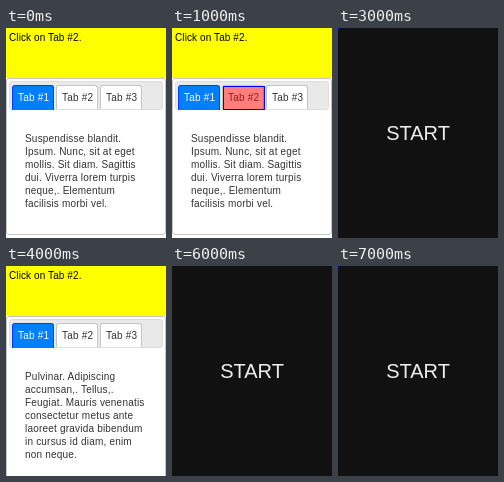
Animation, 160 px wide and 210 px high, one loop 8000 ms. Source, as an HTML page:

```html
<!DOCTYPE html>
<html lang="en">
<head>
<meta charset="utf-8">
<title>Click on the tab</title>
<style>
  html, body { margin: 0; width: 100%; height: 100%; overflow: hidden; background: #fff; }
  * { box-sizing: border-box; }
  body { font: 10px/12px "Liberation Sans", Arial, sans-serif; }
  #stage { position: relative; width: 160px; height: 210px; overflow: hidden; }
  #stage div { position: absolute; white-space: pre; }

  #query { left: 0; top: 0; width: 160px; height: 50px; padding: 4px 3px; background: #ff0; color: #000; letter-spacing: .1px; }
  #widget { left: 0; top: 50px; width: 160px; border: 1px solid #c5c5c5; border-radius: 3px; background: #fff; }
  #nav { left: 3px; top: 53px; width: 154px; height: 29px; border: 1px solid #ddd; border-radius: 3px; background: #e9e9e9; }
  .tab, #panel { letter-spacing: .2px; color: #333; }
  .tab {
    top: 57px; width: 42px; height: 24px; padding: 6px 0 0 5px;
    border: 1px solid #c5c5c5; border-bottom: 0; border-radius: 3px 3px 0 0;
    background: #fff;
  }
  .tab.active { height: 25px; border-color: #003eff; background: #007fff; color: #fff; }
  #panel { left: 19px; top: 104px; line-height: 13px; }
  #mark { left: 51px; top: 58px; width: 42px; height: 24px; border: 1px solid #00f; background: rgba(255, 0, 0, .5); }
  #cover { inset: 0; background: #111; color: #eee; font-size: 20px; line-height: 210px; text-align: center; }
  #dot { left: 0; top: 0; width: 1px; height: 2px; background: #00f; }
</style>
</head>
<body>
<div id="stage">
  <div id="query">Click on Tab #2.</div>
  <div id="widget"></div>
  <div id="nav"></div>
  <div class="tab active" style="left: 6px">Tab #1</div>
  <div class="tab" style="left: 50px">Tab #2</div>
  <div class="tab" style="left: 94px">Tab #3</div>
  <div id="panel"></div>
  <div id="mark"></div>
  <div id="cover">START</div>
  <div id="dot"></div>
</div>
<script>
  const STEP = 1000;
  const pages = [
    ["Suspendisse blandit.", "Ipsum. Nunc, sit at eget", "mollis. Sit diam. Sagittis",
     "dui. Viverra lorem turpis", "neque,. Elementum", "facilisis morbi vel."],
    ["Pulvinar. Adipiscing", "accumsan,. Tellus,.", "Feugiat. Mauris venenatis",
     "consectetur metus ante", "laoreet gravida bibendum", "in cursus id diam, enim", "non neque."]
  ];
  const $ = id => document.getElementById(id);
  const show = (id, on) => { $(id).style.visibility = on ? "visible" : "hidden"; };
  let last = -1;

  // Each page runs through four phases: idle, tab marked, cover, cover with dot.
  function draw(now) {
    const step = Math.floor(now / STEP) % (pages.length * 4);
    if (step !== last) {
      last = step;
      const lines = pages[step >> 2], phase = step % 4;
      $("panel").textContent = lines.join("\n");
      $("widget").style.height = 79 + lines.length * 13 + "px";
      show("mark", phase === 1);
      show("cover", phase >= 2);
      show("dot", phase === 3);
    }
  }

  const start = performance.now();
  function tick() {
    draw(performance.now() - start);
    requestAnimationFrame(tick);
  }
  tick();
</script>
</body>
</html>
```
